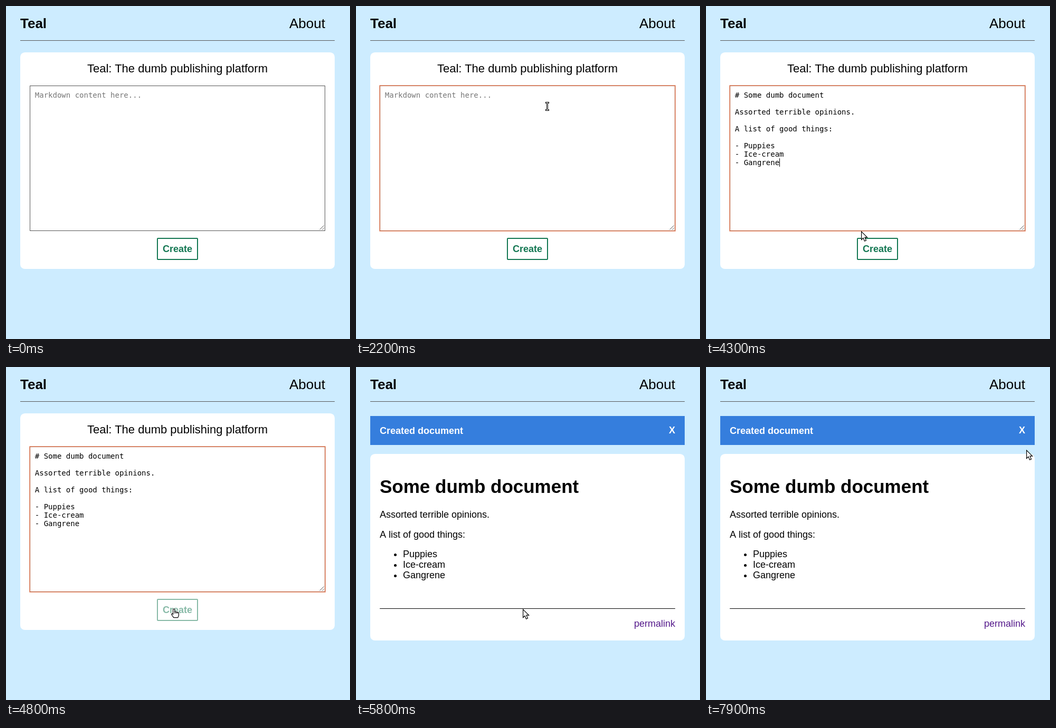
Write an HTML page that moves like this. It is 652 px wide and 632 px high and loops after 8 s.

```html
<!DOCTYPE html>
<html lang="en">
<head>
<meta charset="utf-8">
<title>Teal</title>
<style>
html, body { margin: 0; width: 100%; height: 100%; overflow: hidden; background: #cdecff; }
body { position: relative; font: 18px/20px "Liberation Sans", Arial, sans-serif; color: #000; }
body *, li::before { position: absolute; box-sizing: border-box; margin: 0; padding: 0; white-space: pre; }
svg * { position: static; }
[hidden] { display: none; }
.big { top: 18px; font-size: 26px; line-height: 30px; }
.line { height: 1px; }
.card { left: 27px; width: 596px; border-radius: 8.8px; background: #fff; }
.title { top: 106px; left: 0; width: 650px; text-align: center; font-size: 22px; line-height: 25px; }
#area { left: 45px; top: 151px; width: 560px; height: 276px; border: 1px solid #555; }
#area.focus { border-color: #b9603f; }
.focus { box-shadow: 0 0 0 1px rgba(233, 84, 32, .5); }
.mono { left: 54.8px; top: 161px; font: 14px/16px "DejaVu Sans Mono", monospace; }
#hint { color: #757575; }
#caret { width: 1px; height: 16px; background: #000; }
#create { left: 286px; top: 440px; width: 78px; height: 42px; border: 2px solid #137752; border-radius: 2px;
  color: #137752; font-weight: bold; line-height: 38px; text-align: center; }
#create.hover { opacity: .5; }
.notice { left: 27px; top: 93px; width: 596px; height: 55px; background: #357edd; color: #fff; font-weight: bold; }
h1 { left: 45px; top: 207px; font-size: 35px; line-height: 39px; }
p, ul { left: 45px; font-kerning: none; }
ul { top: 345px; padding-left: 44px; list-style: none; }
li { position: relative; }
li::before { content: ""; left: -17px; top: 9px; width: 5px; height: 5px; border-radius: 50%; background: #000; }
.link { left: 527px; top: 477px; color: #551a8b; }
#stage { left: 0; top: 0; }
</style>
</head>
<body>
<b class="big" style="left:27px">Teal</b>
<div class="big" style="left:537px">About</div>
<div class="line" style="left:27px;top:65px;width:596px;background:#555"></div>

<div id="editor">
  <div class="card" style="top:88px;height:411px"></div>
  <div class="title">Teal: The dumb publishing platform</div>
  <div id="area"></div>
  <div id="hint" class="mono">Markdown content here...</div>
  <div id="text" class="mono"># Some dumb document

Assorted terrible opinions.

A list of good things:

- Puppies
- Ice-cream
- Gangrene</div>
  <div id="caret"></div>
  <svg style="left:590px;top:412px" width="16" height="16"><path d="M4.5 12.5l8-8M9.5 12.5l3-3" stroke="#555"/></svg>
  <div id="create">Create</div>
</div>

<div id="doc" hidden>
  <div class="notice">
    <span style="left:18px;top:18px">Created document</span>
    <span style="left:566px;top:17px">X</span>
  </div>
  <div class="card" style="top:165px;height:354px"></div>
  <h1>Some dumb document</h1>
  <p style="top:270px">Assorted terrible opinions.</p>
  <p style="top:308px">A list of good things:</p>
  <ul><li>Puppies</li><li>Ice-cream</li><li>Gangrene</li></ul>
  <div class="line" style="left:45px;top:458px;width:560px;background:#000"></div>
  <div class="link">permalink</div>
</div>

<svg id="stage" width="652" height="632" fill="none">
  <g id="beam">
    <path d="M-3-6.5h7M-3 7.5h7M.5-7V8" stroke="#000" stroke-width="3"/>
    <path d="M-2-6.5h5M-2 7.5h5M.5-7V8" stroke="#fff"/>
  </g>
  <path id="arrow" d="M.6 1.2V16.5L4 13.3l2.6 5.9 2.9-1.2L7 12.2h4.6z" fill="#fff" stroke="#000" stroke-width="1.2"/>
  <g id="hand" stroke="#000" stroke-width="1.2" stroke-linejoin="round">
    <path d="M.6 10.5V1.7Q.6 0 2.2 0T3.8 1.7V5.6Q5.4 4.9 6.4 6 8 5.4 9 6.7 11.4 6.4 11.4 8.8V12.5L9.8 16.6H1.8L-2.2 11Q-2.8 9-.9 9z" fill="#fff"/>
    <path d="M3.8 5.6V9M6.4 6.2V9M9 6.9V9" stroke-width="1"/>
  </g>
</svg>

<script>
const LOOP = 8000, STEP = 100, BLINK = 600;
const ENTER = 400, FOCUS = 1600, PASTE = 3000, PRESS = 5400, CREATED = 5800;
const origin = [573, 471];
// each sweep is a curve from wherever the pointer rests
const sweeps = [
  { from: ENTER, to: 700, bend: [568, 260], end: [465, 154] },
  { from: 1100, to: FOCUS, bend: [415, 178], end: [362, 190] },
  { from: 2200, to: 2600, bend: [334, 221], end: [305, 250] },
  { from: 3500, to: 3600, bend: [301, 252], end: [298, 254] },
  { from: 3600, to: 4800, bend: [278, 466], end: [316, 459] },
  { from: 6000, to: 6700, bend: [304, 500], end: [424, 487] },
  { from: 6700, to: 7900, bend: [640, 460], end: [607, 157] }
];
const $ = id => document.getElementById(id);
const show = (id, on) => $(id).toggleAttribute("hidden", !on);

function pointer(t) {
  let at = origin;
  for (const { from, to, bend, end } of sweeps) {
    if (t < from) break;
    const u = Math.min(1, (t - from) / (to - from)), v = 1 - u;
    at = at.map((a, i) => v * v * a + 2 * u * v * bend[i] + u * u * end[i]);
  }
  return at.map(Math.round);
}

function draw(t) {
  const editing = t < CREATED, pasted = t >= PASTE;
  const focused = t >= FOCUS && t < PRESS;
  show("editor", editing);
  show("doc", !editing);
  show("hint", !pasted);
  show("text", pasted);

  // the blink restarts with the paste
  const since = t - (pasted ? PASTE : FOCUS);
  show("caret", focused && Math.floor(since / BLINK) % 2 === 0);
  $("caret").style.left = pasted ? "139px" : "55px";
  $("caret").style.top = pasted ? "289px" : "161px";

  const [x, y] = pointer(t);
  const overButton = editing && x > 286 && x < 364 && y >= 440;
  const overText = editing && y > 151 && y < 427;
  const kind = t < ENTER ? "" : overButton ? "hand" : overText ? "beam" : "arrow";
  for (const id of ["beam", "arrow", "hand"]) {
    $(id).style.display = id === kind ? "" : "none";
    $(id).setAttribute("transform", `translate(${x} ${y})`);
  }
  $("area").classList.toggle("focus", focused);
  $("create").classList.toggle("focus", t >= PRESS);
  $("create").classList.toggle("hover", overButton);
}

const start = performance.now();
function tick() {
  const t = (performance.now() - start) % LOOP;
  draw(Math.floor(t / STEP) * STEP);
  requestAnimationFrame(tick);
}
tick();
</script>
</body>
</html>
```
